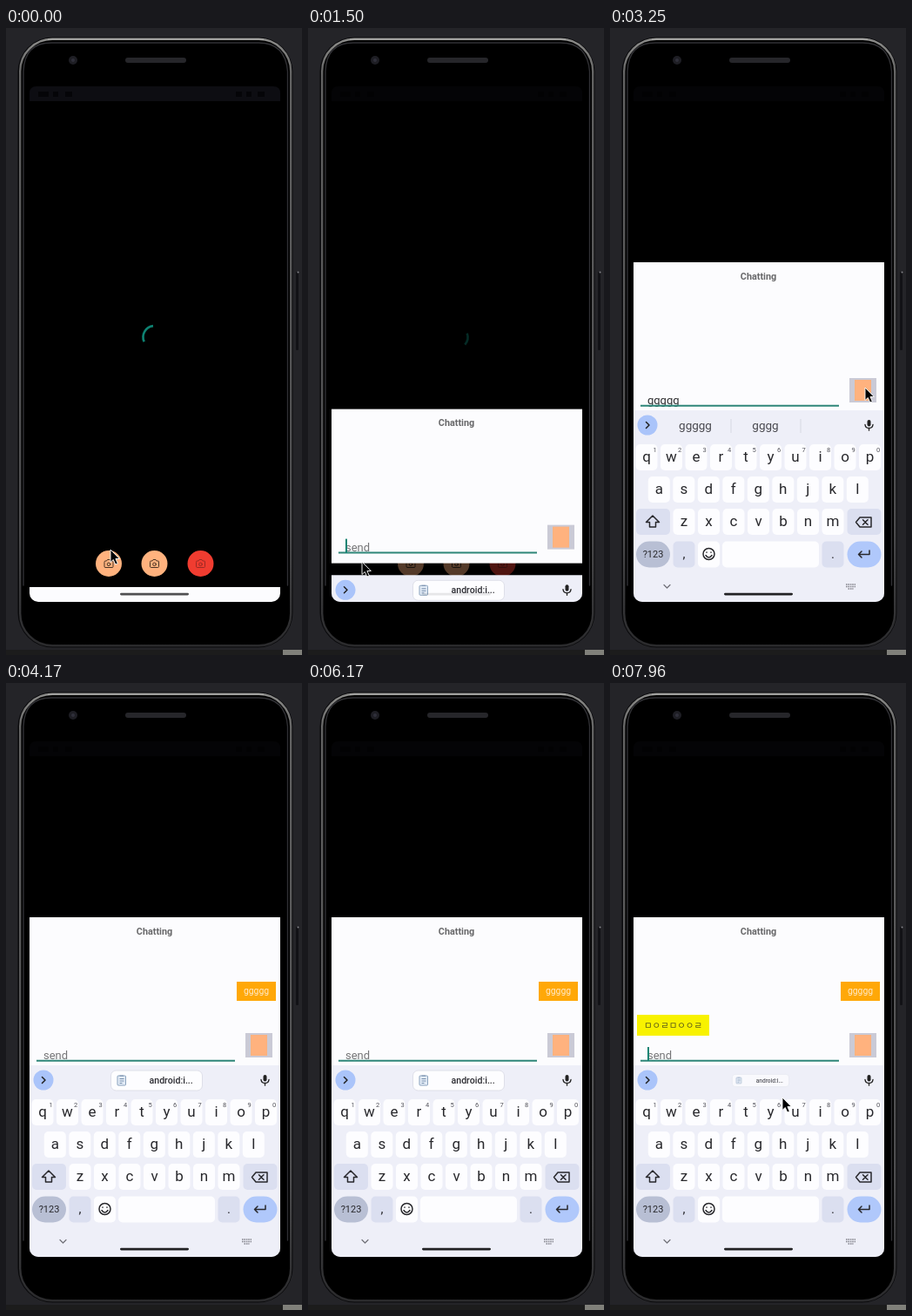
An HTML page that plays this animation: 340x720 px, repeating every 8000 ms.

```html
<!DOCTYPE html>
<html lang="en">
<head>
<meta charset="utf-8">
<title>Chat sheet</title>
<style>
html, body { margin: 0; width: 100%; height: 100%; overflow: hidden; background: #242428; }
svg { display: block; width: 100%; height: 100%; }
text { font-family: Roboto, "Noto Sans CJK KR", "Noto Sans CJK", sans-serif; }
.mid { text-anchor: middle; }
.line { fill: none; stroke-linecap: round; stroke-linejoin: round; }
</style>
</head>
<body>
<svg viewBox="0 0 340 720">
  <defs>
    <clipPath id="screen"><path d="M27 67H315V649a10 10 0 0 1-10 10H37a10 10 0 0 1-10-10Z"/></clipPath>
    <linearGradient id="rim" x1="0" y1="0" x2="0" y2="1">
      <stop offset="0" stop-color="#8c8c8a"/>
      <stop offset=".06" stop-color="#626262"/>
      <stop offset=".8" stop-color="#4c4c4e"/>
      <stop offset="1" stop-color="#2a2a2c"/>
    </linearGradient>
    <g id="camera" class="line" stroke-width="1">
      <path d="M-5 -2.5q0-1 1-1h1.5l1-1.5h3l1 1.5h1.5q1 0 1 1v5.500q0 1-1 1h-8q-1 0-1-1Z"/>
      <circle cy=".3" r="1.800"/>
    </g>
  </defs>

  <rect width="340" height="720" fill="#242428"/>
  <rect y="714" width="318" height="6" fill="#1c1c1c"/>
  <rect x="318" y="714" width="22" height="6" fill="#80807a"/>
  <rect x="333" y="280" width="3" height="90" rx="1" fill="#121216"/>
  <circle cx="335.500" cy="280.500" r="1" fill="#85858a"/>
  <rect x="13.500" y="10.500" width="316" height="701" rx="40" fill="#0a0a0c"/>
  <rect x="16.200" y="12.800" width="311" height="696.500" rx="37" fill="#000" stroke="url(#rim)" stroke-width="2.400"/>
  <path class="line" d="M20 640V50Q21 17 52 17H290Q321 17 323.500 50V640" stroke="#303034" stroke-width="1.400"/>
  <path d="M48 12.800H296" stroke="#b4b4b2"/>
  <circle cx="77" cy="37" r="5" fill="#1e1e24"/>
  <circle cx="77" cy="37" r="2" fill="#30303a"/>
  <rect x="137" y="34" width="70" height="6" rx="3" fill="#26262a"/>

  <g clip-path="url(#screen)">
    <rect x="27" y="67" width="288" height="592" fill="#000"/>
    <path d="M27 84V75q0-8 8-8H307q8 0 8 8V84Z" fill="#0d0d12"/>
    <path d="M37 76h12M54 76h6M68 76h8M264 76h7M276 76h6M289 76h8" stroke="#050508" stroke-width="6"/>
    <path id="spin" class="line" stroke="#0e8272" stroke-width="2.600" style="stroke-linecap:butt"/>
    <circle cx="118" cy="615" r="15" fill="#ffb27e"/>
    <circle cx="170.500" cy="615" r="15" fill="#ffb27e"/>
    <circle cx="223.500" cy="615" r="15" fill="#f03c30"/>
    <use href="#camera" x="118" y="615.500" stroke="#4a3424"/>
    <use href="#camera" x="170.500" y="615.500" stroke="#4a3424"/>
    <use href="#camera" x="223.500" y="615.500" stroke="#9c2a24"/>
    <rect x="27" y="642" width="288" height="17" fill="#fcfcfe"/>
    <rect id="scrim" x="27" y="67" width="288" height="592" fill="#000"/>
    <g id="sheet">
      <rect x="27" width="288" height="177" fill="#fcfcfe"/>
      <text class="mid" x="170.500" y="19.700" font-size="10.800" font-weight="700" fill="#68686a">Chatting</text>
      <g id="sent">
        <rect x="265" y="74" width="45" height="22" fill="#ffa808"/>
        <text class="mid" x="287.500" y="88" font-size="10.400" fill="#ffe9c8">ggggg</text>
      </g>
      <g id="got">
        <rect x="31" y="112" width="83" height="24" fill="#f8f200"/>
        <text class="mid" x="72.500" y="128" font-size="10.400" fill="#55551a">ㅁㅇㄹㅁㅇㅇㄹ</text>
      </g>
      <text id="field" x="43" y="163" font-size="13"></text>
      <path id="under" d="M35 164.800H263"/>
      <rect id="caret" y="149" width="2" height="16" fill="#148474"/>
      <rect x="275" y="133" width="31" height="28" fill="#cacad6"/>
      <rect x="281" y="135" width="19" height="24" fill="#ffb27e"/>
    </g>
    <g id="keyboard">
      <rect x="27" y="439" width="288" height="220" fill="#eeeff8"/>
      <circle cx="43" cy="456" r="11.500" fill="#aac4fa"/>
      <path class="line" d="M41.500 452.500l3.500 3.500-3.500 3.500" stroke="#222" stroke-width="1.500"/>
      <rect x="295.500" y="450" width="4" height="7.500" rx="2" fill="#222"/>
      <path class="line" d="M293 455.500q.5 4 4.500 4t4.500-4M297.500 459.500v2.500" stroke="#222" stroke-width="1.400"/>
      <g id="chip">
        <rect x="121" y="445" width="105" height="23" rx="6" fill="#fdfdff" stroke="#d8dae4" stroke-width=".8"/>
        <rect x="128.500" y="451" width="9.500" height="11" rx="1" fill="#e2ebf6" stroke="#8ba3bd"/>
        <path d="M131 451h4.500M131 454.500h5M131 457h5M131 459.500h3" stroke="#7890ad"/>
        <text x="165" y="460" font-size="10.600" font-weight="500" fill="#2c2c32">android:i...</text>
      </g>
      <g id="words" font-size="13.500" fill="#48484e">
        <path d="M139 449v16M219 449v16" stroke="#d6d8e2"/>
        <text id="word1" class="mid" x="98" y="461"></text>
        <text id="word2" class="mid" x="178.500" y="461"></text>
      </g>
      <g id="keys"></g>
      <g class="line" stroke="#28282c" stroke-width="1.500">
        <path d="M49 560l7.500 7.500h-4v5.500h-7v-5.500h-4Z"/>
        <path d="M282.500 567.500l4.500-5.500h13v11h-13ZM290.500 564.800l5.500 5.500m0-5.500l-5.500 5.500"/>
        <circle cx="113.500" cy="604" r="6.500"/>
        <path d="M110 605.500q3.500 5 7 0M111 602v.3M116 602v.3"/>
        <path d="M298 600v4.500H285.500m3.500-3.500l-3.500 3.500 3.500 3.500"/>
      </g>
      <path class="line" d="M62 639.500l3.500 3.500 3.500-3.500" stroke="#707078" stroke-width="1.200"/>
      <path d="M271 639h11M271 641.500h11M273.500 644h6" stroke="#85858e" stroke-width="1.400" stroke-dasharray="1.600 .8"/>
    </g>
    <rect id="pill" x="131" y="648.700" width="79" height="2.800" rx="1.400"/>
  </g>
  <path id="cursor" d="M0 0V14.500L3.300 11.500 5.700 17 8.300 15.900 5.900 10.500H10.300Z" fill="#000" stroke="#fff" stroke-width=".9"/>
</svg>
<script>
const LOOP = 8000;
const $ = id => document.getElementById(id);
const set = (id, attrs) => { for (const k in attrs) $(id).setAttribute(k, attrs[k]); };
const show = (id, on) => set(id, { visibility: on ? 'inherit' : 'hidden' });
const clamp = x => Math.min(1, Math.max(0, x));
const easeOut = x => 1 - (1 - clamp(x)) ** 3;
const smooth = x => { x = clamp(x); return x * x * (3 - 2 * x); };

// cubic-bezier(.4, 0, .2, 1), solved by bisection
function material(x) {
  x = clamp(x);
  let lo = 0, hi = 1;
  for (let i = 0; i < 20; i++) {
    const s = (lo + hi) / 2, r = 1 - s;
    if (1.2 * r * r * s + 0.6 * r * s * s + s ** 3 < x) lo = s; else hi = s;
  }
  return smooth(lo);
}

function key(x, y, w, label = '', { fill = '#fdfdff', rx = 5, size = 17, hint = '' } = {}) {
  return `<rect x="${x - w / 2}" y="${y - 15}" width="${w}" height="30" rx="${rx}" fill="${fill}"/>` +
    `<text class="mid" x="${x}" y="${y + size * 0.32}" font-size="${size}" fill="#28282c">${label}</text>` +
    `<text class="mid" x="${x + 9.5}" y="${y - 6}" font-size="7.5" fill="#505058">${hint}</text>`;
}

function buildKeys() {
  const row = (letters, x0, y, hints = '') =>
    [...letters].map((c, i) => key(x0 + 28.5 * i, y, 25, c, { hint: hints[i] || '' })).join('');
  const grey = '#dbdff0';
  $('keys').innerHTML =
    row('qwertyuiop', 42, 493, '1234567890') +
    row('asdfghjkl', 56.3, 530) +
    row('zxcvbnm', 85, 567) +
    key(49.5, 567, 39, '', { fill: grey }) +
    key(292, 567, 39, '', { fill: grey }) +
    key(49.5, 604.5, 39, '?123', { fill: '#b8bfd4', rx: 15, size: 11 }) +
    key(85, 604.5, 25, ',', { fill: grey, size: 15 }) +
    key(113.5, 604.5, 25) +
    key(184.5, 604.5, 111) +
    key(256, 604.5, 25, '.', { fill: grey, size: 15 }) +
    key(292, 604.5, 39, '', { fill: '#b0c8fb', rx: 15 });
}

// time, x, y
const path = [
  [0, 120, 599], [300, 120, 600], [670, 122, 609], [1150, 62, 613], [1850, 62, 613],
  [2150, 170, 530], [2780, 170, 530], [3180, 293, 413],
  [3550, 293, 413], [4000, 352, 400], [7350, 352, 440], [7960, 198, 476], [8000, 196, 476]
];

function cursorAt(t) {
  const i = Math.max(1, path.findIndex(p => p[0] > t));
  const [t0, x0, y0] = path[i - 1], [t1, x1, y1] = path[i];
  const k = smooth((t - t0) / (t1 - t0));
  return [x0 + (x1 - x0) * k, y0 + (y1 - y0) * k];
}

function arc(cx, cy, r, from, to) {
  const pt = d => [cx + r * Math.cos(d * Math.PI / 180), cy + r * Math.sin(d * Math.PI / 180)];
  return `M${pt(from)}A${r} ${r} 0 ${to - from > 180 ? 1 : 0} 1 ${pt(to)}`;
}

// the head runs ahead in the first half of a turn, the tail catches up in the second
function spinner(t) {
  const turn = 0.7 + t / 1422, p = turn % 1;
  const base = 198 + 216 * turn + 270 * Math.floor(turn);
  const tail = base + 270 * material(2 * p - 1);
  const head = base + 4 + 270 * material(2 * p);
  return arc(170.5, 355, 13, tail, head);
}

const OPEN = 300, FOCUS = 1380, TYPE = 2200, STEP = 130, SEND = 3500, REPLY = 7000;

function draw(t) {
  set('spin', { d: spinner(t) });

  const open = easeOut((t - OPEN) / 260);
  const lift = material((t - FOCUS - 60) / 300);
  set('scrim', { opacity: 0.67 * open });
  set('sheet', { transform: `translate(0 ${659 - 194 * open - 196 * lift})` });
  show('sheet', open > 0);
  set('keyboard', { transform: `translate(0 ${220 * (1 - lift)})` });
  show('keyboard', lift > 0);
  const pill = lift === 0 ? 1 : 0.1 + 0.9 * clamp((t - 1800) / 250);
  set('pill', { fill: open < 0.5 ? '#505052' : '#222224', opacity: pill });

  const typed = t < TYPE || t >= SEND ? 0 : Math.min(5, 1 + Math.floor((t - TYPE) / STEP));
  const word = 'g'.repeat(typed);
  const focus = t >= FOCUS;
  $('field').textContent = word || 'send';
  set('field', { fill: typed ? '#2e2e30' : '#757577' });
  set('under', { stroke: focus ? '#2e8678' : '#88888a', 'stroke-width': focus ? 2 : 1 });

  const edited = t >= SEND ? SEND : typed ? TYPE + (typed - 1) * STEP : FOCUS;
  show('caret', focus && Math.floor((t - edited) / 500) % 2 === 0);
  set('caret', { x: 43 + 7.3 * typed });

  show('words', typed > 0);
  $('word1').textContent = word;
  $('word2').textContent = word.slice(1);
  show('chip', !typed);
  const out = clamp((t - 7900) / 100);
  set('chip', {
    transform: `translate(173 456.5) scale(${1 - 0.62 * out}) translate(-173.5 -456.5)`,
    opacity: 1 - 0.4 * out
  });

  show('sent', t >= SEND);
  show('got', t >= REPLY);
  set('cursor', { transform: `translate(${cursorAt(t)})` });
}

function tick(now) {
  draw(now % LOOP);
  requestAnimationFrame(tick);
}

buildKeys();
draw(0);
requestAnimationFrame(tick);
</script>
</body>
</html>
```
